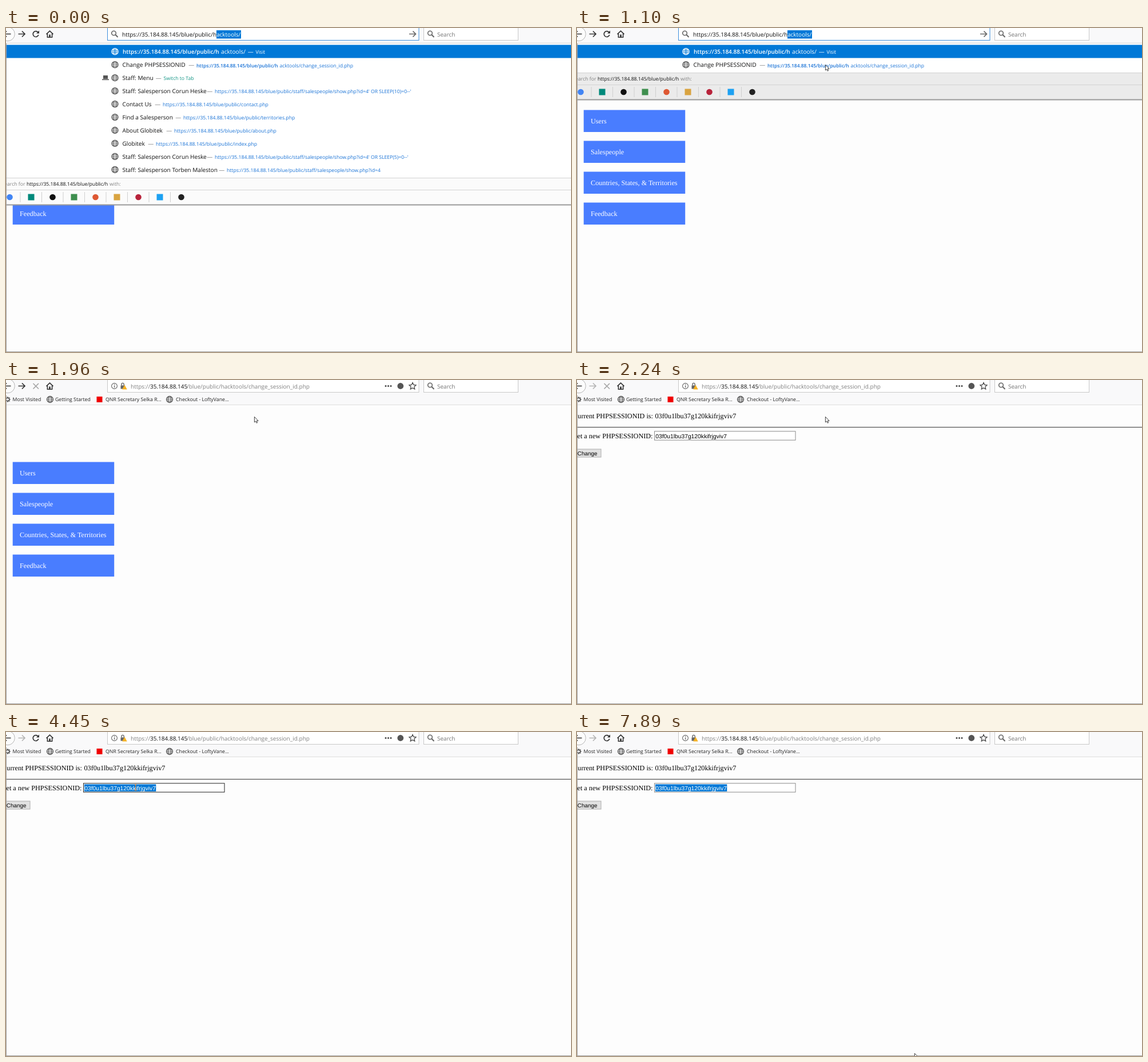
Animation of 988 by 567 pixels, one loop 8000 ms. Source, as an HTML page:

```html
<!DOCTYPE html>
<html lang="en">
<head>
<meta charset="utf-8">
<title>Changing a session id</title>
<style>
html, body { margin: 0; width: 100%; height: 100%; overflow: hidden; background: #fdfdfd; }
svg { display: block; width: 988px; height: 567px; }
text { font-family: "Open Sans", "Noto Sans", sans-serif; text-rendering: geometricPrecision; white-space: pre; }
.serif { font-family: "Liberation Serif", "Times New Roman", serif; }
.arial { font-family: "Liberation Sans", Arial, sans-serif; }
</style>
</head>
<body>
<svg id="stage" viewBox="0 0 988 567"></svg>
<script>
const LOOP = 8000;
const BLUE = '#0078d7', LINK = '#1a73d6', TEAL = '#139585', INK = '#111', GREY = '#555', DIM = '#808080';
const HOST = '35.184.88.145';
const BASE = `https://${HOST}/blue/public/`;
const SESSION = '03f0u1lbu37g120kkifrjgviv7';

const rect = (x, y, w, h, fill, extra = '') =>
  `<rect x="${x}" y="${y}" width="${w}" height="${h}" fill="${fill}" ${extra}/>`;
const text = (x, y, size, fill, str, extra = '') =>
  `<text x="${x}" y="${y}" font-size="${size}" fill="${fill}" ${extra}>${str}</text>`;
const line = (d, stroke, width = 1, extra = '') =>
  `<path d="${d}" fill="none" stroke="${stroke}" stroke-width="${width}" ${extra}/>`;
const dot = (x, y, r, fill, extra = '') =>
  `<circle cx="${x}" cy="${y}" r="${r}" fill="${fill}" ${extra}/>`;
const BOLD = 'font-weight="600"';
const END = 'text-anchor="end"';

const globe = (x, y, c) => dot(x, y, 5.5, 'none', `stroke="${c}" stroke-width="1.3"`) +
  `<ellipse cx="${x}" cy="${y}" rx="2.6" ry="5.5" fill="none" stroke="${c}"/>` +
  line(`M${x - 5.5} ${y}h11M${x - 4.6} ${y - 2.9}h9.2M${x - 4.6} ${y + 2.9}h9.2`, c, 0.9);

const glass = (x, y) => dot(x, y, 3.8, 'none', 'stroke="#666" stroke-width="1.6"') +
  line(`M${x + 2.8} ${y + 2.8}l4.2 4.2`, '#666', 2);

const arrowRight = (x, y, c) => line(`M${x} ${y}h11.5m-5-5l5 5l-5 5`, c, 1.7);

function reload(kind) {
  if (kind === 'stop') return line('M47.5 6l9.5 9.5m0-9.5l-9.5 9.5', '#a5a5a5', 1.7);
  const c = kind === 'dim' ? '#a5a5a5' : '#333';
  return line('M56 7.6A4.9 4.9 0 1 0 56.8 12', c, 1.7) + `<path d="M58 4.6v5h-5z" fill="${c}"/>`;
}

function navBar(s) {
  let out = rect(0, 0, 988, 26, '#f9f9fa') +
    dot(3, 10.5, 12.3, '#fcfcfc', 'stroke="#b5b5b5"') +
    line('M-3 10.5h11.5M1 5.5l-5 5l5 5', '#333', 1.7) +
    arrowRight(21.5, 10.5, s.page === 'menu' ? '#333' : '#b4b4b4') +
    reload(s.reload) +
    line('M70.5 10.8l6-5.6l6 5.6M72.4 10v6.2h8.2v-6.2', '#333', 1.6) +
    rect(75.2, 11.5, 2.6, 5, '#333') +
    rect(730.5, -2, 165, 23.5, '#fff', 'stroke="#c8c8c8"') +
    glass(741.5, 9) + text(754, 15.3, 10, '#757575', 'Search');
  const typing = s.list > 0;
  out += rect(177.5, -2, 544.5, 23.5, '#fff', `stroke="${typing ? '#3c8fdc' : '#c8c8c8'}"`);
  if (typing) {
    return out + glass(188.5, 9) + text(203, 15.3, 10, INK, BASE + 'h') +
      rect(368, 4, 43, 14.5, BLUE) + text(368, 15.3, 10, '#fff', 'acktools/') +
      arrowRight(705, 10.5, '#666');
  }
  return out + dot(189.5, 10.5, 4.9, 'none', 'stroke="#666" stroke-width="1.1"') +
    rect(188.9, 9.7, 1.3, 3.6, '#666') + rect(188.9, 7.4, 1.3, 1.3, '#666') +
    rect(200.5, 9.5, 7, 6, '#666') + line('M202 9.5v-2a2.1 2.1 0 0 1 4.2 0v2', '#666', 1.4) +
    '<path d="M207.4 8.6l4.3 8h-8.6z" fill="#f5b225"/>' +
    text(218, 15.3, 10, DIM, 'https://') + text(252, 15.3, 10, INK, HOST) +
    text(316, 15.3, 10, DIM, '/blue/public/hacktools/change_session_id.php') +
    [664, 668.5, 673].map(x => dot(x, 10.5, 1.5, '#444')).join('') +
    dot(689.8, 10.5, 5.4, '#555') +
    line('M711 4.6l1.8 3.9l4.2.5l-3.1 2.9l.8 4.2l-3.7-2.1l-3.7 2.1l.8-4.2l-3.1-2.9l4.2-.5z', '#444', 1.3);
}

function bookmarks() {
  const label = (x, str) => text(x, 37.4, 8.75, '#222', str);
  return rect(0, 25, 988, 18, '#f9f9fa') + line('M0 43.5h988', '#dedede') +
    dot(3, 34, 2.8, 'none', 'stroke="#444" stroke-width="1.4"') +
    line('M3 29v2m0 6v2m-5-5h2m6 0h2m-8.5-3.5l1.4 1.4m4.2 4.2l1.4 1.4m0-7l-1.4 1.4m-4.2 4.2l-1.4 1.4', '#444', 1.2) +
    label(11.5, 'Most Visited') + globe(77, 34, GREY) + label(86, 'Getting Started') +
    rect(158.5, 29, 10, 10, '#f00000') + label(174, 'QNR Secretary Selka R...') +
    globe(286, 34, GREY) + label(297, 'Checkout - LoftyVane...');
}

// title, x of the address, address
const ROWS = [
  ['Staff: Menu', 275.5, 'Switch to Tab'],
  ['Staff: Salesperson Corun Heske', 365, "staff/salespeople/show.php?id=4' OR SLEEP(10)=0--'"],
  ['Contact Us', 274, 'contact.php'],
  ['Find a Salesperson', 310, 'territories.php'],
  ['About Globitek', 294, 'about.php'],
  ['Globitek', 262, 'index.php'],
  ['Staff: Salesperson Corun Heske', 365, "staff/salespeople/show.php?id=4' OR SLEEP(5)=0--'"],
  ['Staff: Salesperson Torben Maleston', 386, 'staff/salespeople/show.php?id=4'],
];
const ENGINES = ['#4285f4', '#00897b', '#111', '#3f8f4f', '#de5833', '#d9a441', '#b8233b', '#1da1f2', '#222'];

function suggestions(s) {
  const full = s.list > 2;
  const end = full ? 262 : 78;
  const strip = full ? '#fbfbfb' : '#ebebeb';
  const tone = (i, c) => s.pick === i ? '#fff' : c;
  const dash = (x, y, c) => text(x - 13.7, y, 10, c, '—');
  let out = rect(0, 26, 988, end - 26, '#fff') + line('M0 26.5h988', '#d4d4d4') +
    rect(0, s.pick ? 52.7 : 29.5, 988, 23, BLUE) +
    globe(190.5, 41.2, tone(0, GREY)) +
    text(204, 45.3, 9.95, tone(0, INK), BASE + 'h', BOLD) +
    text(376, 45.3, 10.2, tone(0, INK), 'acktools/') +
    dash(436.5, 45.3, tone(0, DIM)) + text(436.5, 45, 8.63, tone(0, TEAL), 'Visit') +
    globe(190.5, 64.2, tone(1, GREY)) +
    text(203.5, 68.3, 10.25, tone(1, INK), 'Change PHPSESSIONID') +
    dash(333, 68.3, tone(1, DIM)) +
    text(333, 68.5, 8.42, tone(1, LINK), BASE + 'h', BOLD) +
    text(478.5, 68.5, 8.63, tone(1, LINK), 'acktools/change_session_id.php');
  if (full) {
    out += ROWS.map(([title, x, url], i) => {
      const y = 87.2 + i * 22.95;
      return globe(190.5, y, GREY) + text(203.5, y + 4.1, 10.12, INK, title) + dash(x, y + 4.1, DIM) +
        text(x, y + 4.2, 8.63, i ? LINK : TEAL, i ? BASE + url : url);
    }).join('') + rect(170, 83, 8, 6, '#555') + rect(168, 89.5, 12, 1.6, '#555');
  }
  out += rect(0, end, 988, 47, strip) + line(`M0 ${end + 0.5}h988M0 ${end + 21.5}h988`, '#d2d2d2') +
    text(33.5, end + 14.4, 8.65, DIM, 'Search for', END) +
    text(36, end + 14.4, 8.65, INK, BASE + 'h') +
    text(181, end + 14.4, 8.65, DIM, 'with:');
  const y = end + 34;
  ENGINES.forEach((c, i) => {
    const x = 6.5 + i * 37.5;
    out += i % 2 ? rect(x - 5.5, y - 5.5, 11, 11, c) : dot(x, y, 5.3, c);
    if (i < 8) out += line(`M${x + 18.5} ${y - 9}v18`, '#cfcfcf');
  });
  return out + rect(0, end + 46.5, 988, 2, '#999');
}

function menuPage() {
  return ['Users', 'Salespeople', 'Countries, States, &amp; Territories', 'Feedback'].map((label, i) => {
    const y = 143.5 + i * 54;
    return rect(11.7, y, 177.5, 38.5, '#497dff') + text(24, y + 23.4, 12.2, '#fff', label, 'class="serif"');
  }).join('');
}

function sessionPage(s) {
  const serif = (x, y, str, extra = '') => text(x, y, 12.23, '#000', str, 'class="serif" ' + extra);
  return serif(133, 67.4, 'Current PHPSESSIONID is:', END) + serif(136.5, 67.4, SESSION) +
    line('M0 82.6h988', '#555', 1.3) +
    serif(132.5, 101.9, 'Set a new PHPSESSIONID:', END) +
    rect(135.5, 89.8, 246.5, 15.4, '#fff', `stroke="${s.hover ? '#222' : '#8a8a8a'}"`) +
    (s.selected ? rect(137, 91.5, 125.3, 12.5, BLUE) : '') +
    text(137.2, 101.7, 10.3, s.selected ? '#fff' : '#000', SESSION, 'class="arial"') +
    (s.caret ? line('M226.5 92v11', '#000') : '') +
    rect(-6, 121, 48, 14, '#e1e1e1', 'stroke="#adadad"') +
    text(0.8, 131.8, 9.9, '#000', 'Change', 'class="arial"');
}

function pointer(s) {
  if (!s.at) return '';
  const [x, y] = s.at;
  if (s.hover) return line(`M${x - 2} ${y - 5}h4m-2 0v10m-2 0h4`, s.selected ? '#ff8728' : '#222', 0.9);
  return `<path transform="translate(${x} ${y})" d="M.4.4v9.6l2.2-2l1.5 3.3l1.6-.7l-1.5-3.2h2.9z" ` +
    'fill="#fff" stroke="#222" stroke-width=".85"/>';
}

// time, changes to the state
const STEPS = [
  [0, { page: 'menu', list: 10, pick: 0, reload: 'on' }],
  [290, { list: 2 }],
  [430, { at: [397, 44] }],
  [550, { at: [422, 57] }],
  [670, { at: [434, 64] }],
  [1820, { pick: 1 }],
  [1960, { list: 0, reload: 'stop' }],
  [2110, { page: 'session' }],
  [2380, { reload: 'dim' }],
  [2530, { at: [418, 61], reload: 'on' }],
  [2650, { at: [370, 59] }],
  [2770, { at: [321, 62] }],
  [2920, { at: [275, 74] }],
  [3040, { at: [240, 86] }],
  [3200, { at: [239, 95.5], hover: true }],
  [3630, { at: [230.5, 97] }],
  [3780, { at: [226.5, 97] }],
  [4060, { caret: true }],
  [4180, { caret: false, selected: true }],
  [6660, { at: [372, 234], hover: false }],
  [6780, { at: [462, 366] }],
  [6900, { at: [532, 470] }],
  [7180, { at: [624, 447] }],
  [7340, { at: [650, 512] }],
  [7740, { at: [623, 529] }],
  [7890, { at: [590, 562] }],
];

const stage = document.getElementById('stage');
let shown = -1;

function draw(index) {
  const s = Object.assign({}, ...STEPS.slice(0, index + 1).map(step => step[1]));
  stage.innerHTML = rect(0, 0, 988, 567, '#fdfdfd') +
    (s.page === 'menu' ? menuPage() : sessionPage(s)) +
    navBar(s) + (s.list ? suggestions(s) : bookmarks()) +
    line('M.5 27v540M0 566.5h988', '#a0a0a0') + pointer(s);
}

function tick() {
  const t = performance.now() % LOOP;
  const index = STEPS.filter(step => step[0] <= t).length - 1;
  if (index !== shown) draw(shown = index);
  requestAnimationFrame(tick);
}
tick();
</script>
</body>
</html>
```
